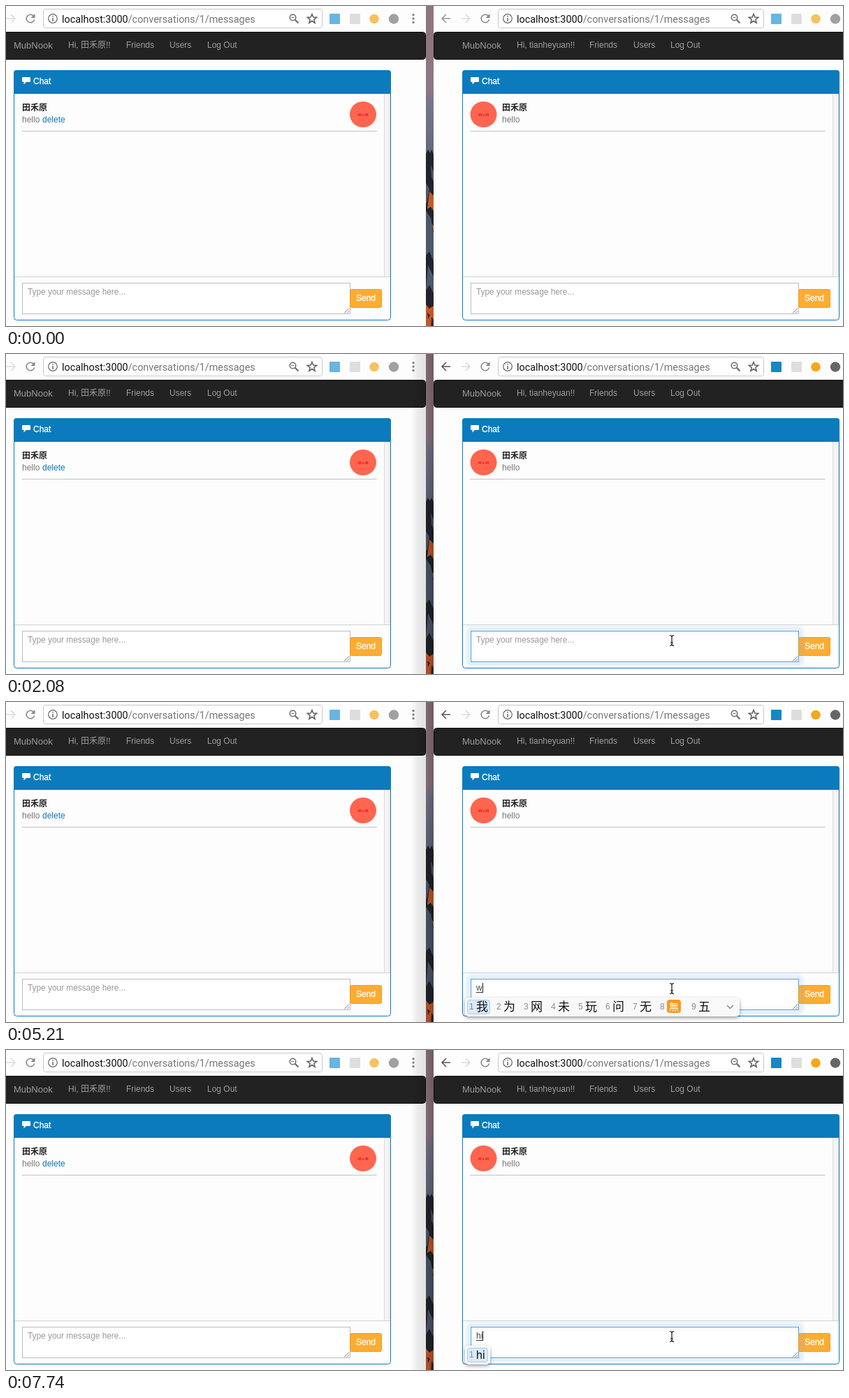
Recreate the animation shown at these times as an HTML page. Size 1198 by 459 pixels, loop 8000 ms.

```html
<!DOCTYPE html>
<html lang="en">
<head>
<meta charset="utf-8">
<title>Two chat windows</title>
<style>
  html, body { margin: 0; width: 100%; height: 100%; overflow: hidden; background: #fdfdfd; }
  svg { display: block; }
  text { font: 12px "Liberation Sans", "Noto Sans CJK SC", "Noto Sans CJK", sans-serif; white-space: pre; }
  .bar { --ink: #999; --blue: #66b5e3; --gold: #f6c25f; --ring: #a0a0a0; }
  .bar.on { --ink: #555; --blue: #1487c6; --gold: #f5a81c; --ring: #666; }
  .url { font: 14.4px Roboto, "Open Sans", sans-serif; }
  .brand { font-size: 13px; }
  .nav { fill: #9d9d9d; }
  .name { font-weight: bold; fill: #222; }
  .hint { font-size: 11.85px; fill: #999; }
  .strong { fill: #fff; stroke: #fff; stroke-width: .3; }
  .cand { font: 17px "Noto Sans CJK SC", "Noto Sans CJK", sans-serif; fill: #111; }
  .latin { font: 16px "Liberation Sans", sans-serif; }
  .num { fill: #8a8a8a; }
  .line { fill: none; stroke-width: 1.5; }
</style>
</head>
<body>
<svg id="stage" width="1198" height="459" viewBox="0 0 1198 459"></svg>
<script>
const LOOP = 8000;
const USER = '田禾原', LOGIN = 'tianheyuan', BRAND = 'MubNook';

const rect = (x, y, w, h, fill, more = '') =>
  `<rect x="${x}" y="${y}" width="${w}" height="${h}" fill="${fill}" ${more}/>`;
const box = (x, y, w, h, fill, stroke, r = 0, more = '') =>
  rect(x + .5, y + .5, w - 1, h - 1, fill, `stroke="${stroke}" rx="${r}" ${more}`);
const text = (x, y, str, cls = '', fill = '') =>
  `<text x="${x}" y="${y}" class="${cls}"${fill && ` fill="${fill}"`}>${str}</text>`;
const path = (d, stroke, more = '') => `<path class="line" d="${d}" stroke="${stroke}" ${more}/>`;
const disc = (x, y, r, fill) => `<circle cx="${x}" cy="${y}" r="${r}" fill="${fill}"/>`;

function star(cx, cy) {
  const pts = Array.from({ length: 10 }, (_, i) => {
    const a = (i / 5 - .5) * Math.PI, r = i % 2 ? 3 : 7;
    return `${(cx + r * Math.cos(a)).toFixed(1)},${(cy + r * Math.sin(a)).toFixed(1)}`;
  });
  return `<polygon class="line" points="${pts.join(' ')}" stroke="#5f5f5f" stroke-width="1.2"/>`;
}

const arrow = (x, dir, color) =>
  path(`M${x - 6 * dir} 18H${x + 6 * dir}M${x} 12L${x + 6 * dir} 18L${x} 24`, color);

// Browser toolbar around an address field from x0 to x1.
function toolbar(x0, x1, id) {
  const rx = x0 - 18;
  return `<g id="${id}" class="bar">` +
    arrow(x0 - 74, -1, 'var(--ink)') + arrow(x0 - 46, 1, '#dadada') +
    path(`M${rx + 4.4} 14.2A5.8 5.8 0 1 0 ${rx + 5.6} 19.5`, '#888') +
    `<path d="M${rx + 6.5} 11V17H${rx + .5}Z" fill="#888"/>` +
    box(x0, 4, x1 - x0, 28, '#fff', '#c9c9c9', 3) +
    `<circle cx="${x0 + 14}" cy="18" r="6.3" class="line" stroke="#666" style="stroke-width:1.2"/>` +
    rect(x0 + 13.3, 17, 1.5, 5, '#666') + rect(x0 + 13.3, 14, 1.5, 1.6, '#666') +
    text(x0 + 27, 23.5, 'localhost:3000<tspan fill="#757575">/conversations/1/messages</tspan>', 'url', '#111') +
    `<circle cx="${x1 - 42.5}" cy="16.5" r="4.3" class="line" stroke="#666"/>` +
    path(`M${x1 - 39.3} 19.7L${x1 - 34.5} 24.5`, '#666', 'style="stroke-width:2"') +
    path(`M${x1 - 44.5} 16.5h4`, '#666', 'style="stroke-width:1"') +
    star(x1 - 15, 18.5) +
    rect(x1 + 10, 11, 15, 15, 'var(--blue)', 'rx="1"') +
    rect(x1 + 39, 11, 15, 15, '#dedede', 'rx="1"') +
    disc(x1 + 74, 18.5, 6.8, 'var(--gold)') +
    disc(x1 + 102, 18.5, 7.2, 'var(--ring)') +
    [12.5, 18, 23.5].map(y => disc(x1 + 130, y, 1.6, '#777')).join('') + '</g>';
}

function navbar(x, w, items) {
  return box(x, 37, w, 40, '#222', '#0a0a0a', 4) +
    items.map(([tx, str], i) => text(tx, i ? 60 : 61, str, i ? 'nav' : 'nav brand')).join('');
}

const avatar = cx =>
  `<ellipse cx="${cx}" cy="155.5" rx="19" ry="18.6" fill="#ff654f"/>` +
  `<text x="${cx}" y="158" text-anchor="middle" fill="#e8101c" style="font-size:4.6px;font-weight:bold">48 x 48</text>`;

function panel(dx, mine) {
  const nx = mine ? 23 : 68;
  return `<g transform="translate(${dx} 0)">` +
    box(11, 92, 540, 359, '#fdfdfd', '#0b7bbd', 4) +
    '<path d="M11 126V96a4 4 0 0 1 4-4H547a4 4 0 0 1 4 4V126Z" fill="#0b7bbd"/>' +
    '<path d="M24 102H34a1 1 0 0 1 1 1V108a1 1 0 0 1-1 1H29L25.5 112.5V109H24a1 1 0 0 1-1-1V103a1 1 0 0 1 1-1Z" fill="#fff"/>' +
    text(39, 112, 'Chat', 'strong') +
    rect(541, 126, 9, 262, '#f4f4f4') + rect(541, 126, 1, 262, '#dcdcdc') + rect(548, 126, 2, 262, '#e9e9e9') +
    text(nx, 150, USER, 'name') + text(nx, 167, 'hello', '', '#777') +
    (mine ? text(52, 167, 'delete', '', '#0f76b5') : '') + avatar(mine ? 511 : 41.5) +
    path('M23 179.5H530', '#888', 'style="stroke-width:1" stroke-dasharray="1 1"') +
    rect(12, 388, 538, 1, '#d2d2d2') +
    box(23, 397, 470, 45, '#fff', '#bdbdbd', 0, mine ? '' : 'id="field"') +
    `<g ${mine ? '' : 'id="hint"'}>${text(31, 414, 'Type your message here...', 'hint')}</g>` +
    path('M484 440.5L491 433.5M488 440.5L491 437.5', '#777', 'style="stroke-width:1"') +
    box(492, 406, 46, 27, '#ffac32', '#f29d17', 2) +
    text(501, 423, 'Send', 'strong') + '</g>';
}

const wallpaper = () =>
  rect(601, 0, 11, 459, 'url(#sky)') +
  '<path d="M601 212L604 206L607 211L609 206L612 213V459H601Z" fill="#22242b"/>' +
  '<path d="M601 254L606 262L603 280L601 284ZM608 228L612 238V252L609 245ZM601 294L608 304L612 326V366L606 352L601 358ZM604 372L612 388V412L606 400L601 408Z" fill="#4c586b"/>' +
  '<path d="M606 266L612 272V294L608 288L603 291ZM601 428L606 434L612 430V459H601ZM609 312L612 316V322Z" fill="#c4592b"/>' +
  '<path d="M603 440L607 443L604 449ZM609 446L612 450V459H608Z" fill="#3a2d2c"/>';

stage.innerHTML = `
  <defs>
    <linearGradient id="sky" x2="0" y2="1">
      <stop stop-color="#8f747e"/><stop offset=".26" stop-color="#8d7885"/>
      <stop offset=".3" stop-color="#77758a"/><stop offset=".45" stop-color="#656a7c"/>
    </linearGradient>
    <linearGradient id="shade">
      <stop stop-opacity="0"/><stop offset=".28" stop-opacity=".07"/>
      <stop offset=".65" stop-opacity=".1"/><stop offset="1" stop-opacity=".22"/>
    </linearGradient>
    <filter id="glow" x="-5%" y="-40%" width="110%" height="180%"><feGaussianBlur stdDeviation="3"/></filter>
    <filter id="drop" x="-30%" y="-50%" width="160%" height="220%">
      <feDropShadow dx="0" dy="2" stdDeviation="2.5" flood-opacity=".4"/>
    </filter>
  </defs>` +
  rect(0, 0, 601, 459, '#fdfdfd') + toolbar(53, 453, 'leftBar') +
  navbar(-10, 611, [[11, BRAND], [89, `Hi, ${USER}!!`], [172, 'Friends'], [234, 'Users'], [288, 'Log Out']]) +
  panel(0, true) + wallpaper() +
  `<g id="shadow">${rect(580, 0, 32, 459, 'url(#shade)')}</g>` +
  rect(612, 0, 586, 459, '#fdfdfd') + toolbar(704, 1085, 'rightBar') +
  navbar(612, 600, [[653, BRAND], [731, `Hi, ${LOGIN}!!`], [835, 'Friends'], [898, 'Users'], [951, 'Log Out']]) +
  `<g id="halo">${rect(664, 396, 472, 47, '#66afe9', 'opacity=".6" filter="url(#glow)"')}</g>` +
  panel(642, false) +
  `<g id="halo2">${box(662, 394, 476, 51, 'none', '#66afe9', 4, 'opacity=".3" style="stroke-width:5" filter="url(#glow)"')}</g>
  <g id="typed"></g>
  ${rect(673, 403, 1, 14, '#222', 'id="caret"')}
  <g id="popup"></g>
  <path id="pointer" d="M0 0V14.5L3.4 11.4L5.7 16.8L8.2 15.7L5.9 10.5H10.4Z" fill="#000" stroke="#fff"/>
  <path id="beam" class="line" d="M-3 -7.5Q0 -7.5 0 -5Q0 -7.5 3 -7.5M0 -5V5M-3 7.5Q0 7.5 0 5Q0 7.5 3 7.5M-2 3H2" stroke="#111" style="stroke-width:1.2"/>`;

const el = id => document.getElementById(id);

// Tracks hold [start time, value]; values stay until the next step.
const active = [[0, false], [140, true]];
const focus = [[0, false], [1490, true]];
const caretOn = [[0, false], [1490, true], [2080, false], [2530, true], [2970, false], [3570, true],
  [4020, false], [4460, true], [5060, false], [5210, true], [5800, false], [6240, true], [6840, false], [7290, true]];
const word = [[0, ''], [4460, 'w'], [4610, 'wo'], [5210, 'w'], [5350, ''], [7290, 'h'], [7740, 'hi']];
const mouse = [[0, null], [290, [1034, 352]], [440, [1012, 358]], [590, [995.5, 364]], [740, [976, 371]],
  [890, [955, 441]], [1190, [951, 435, 1]], [1340, [952, 424, 1]], [1490, [953, 414, 1]], [1630, [953, 411, 1]]];
const choices = { w: '我为网未玩问无無五', wo: '我握窝卧沃喔涡無倭', h: '和会好还后很话回号', hi: ['hi'] };

const at = (track, t) => track.reduce((v, step) => t >= step[0] ? step[1] : v, track[0][1]);

function candidates(key) {
  if (!key) return '';
  const list = [...choices[key]], single = list.length === 1;
  let x = 663;
  const items = list.map((c, i) => {
    const wide = c === '無', cx = x + 10;
    const item = text(x, 441, i + 1, 'num') + (wide
      ? rect(cx, 427, 20, 19, '#f99a1c', 'rx="4"') +
        `<text x="${cx + 3}" y="442" class="cand" style="font-size:14px;fill:#fff">無</text>`
      : text(cx, 443, c, single ? 'cand latin' : 'cand'));
    x += wide ? 45 : 39;
    return item;
  }).join('');
  return rect(657, 424, single ? 36 : 393, 27, '#f9f9f9', 'rx="5" filter="url(#drop)"') +
    box(660, 427, single ? 30 : 33, 21, '#dbeafa', '#a9cbee', 3) + items +
    (single ? '' : path('M1032 435L1036.5 439.5L1041 435', '#888'));
}

let shown = null;
function setWord(key) {
  if (key === shown) return;
  shown = key;
  el('hint').style.display = key ? 'none' : '';
  el('typed').innerHTML = key ? text(673, 414, key, '', '#444') : '';
  const w = key ? el('typed').firstChild.getComputedTextLength() : 0;
  if (key) el('typed').innerHTML += rect(673, 416, Math.round(w), 1, '#333');
  el('caret').setAttribute('x', 673 + Math.round(w));
  el('popup').innerHTML = candidates(key);
}

const show = (id, on) => { el(id).style.display = on ? '' : 'none'; };

function draw(t) {
  const on = active.length && at(active, t), focused = at(focus, t), m = at(mouse, t);
  el('rightBar').classList.toggle('on', on);
  show('shadow', on);
  show('halo', focused);
  show('halo2', focused);
  el('field').setAttribute('stroke', focused ? '#58a6dc' : '#bdbdbd');
  setWord(at(word, t));
  show('caret', at(caretOn, t));
  show('pointer', m && !m[2]);
  show('beam', m && m[2]);
  if (m) el(m[2] ? 'beam' : 'pointer').setAttribute('transform', `translate(${m[0]} ${m[1]})`);
}

const start = performance.now();
function tick() {
  draw((performance.now() - start) % LOOP);
  requestAnimationFrame(tick);
}
tick();
</script>
</body>
</html>
```
